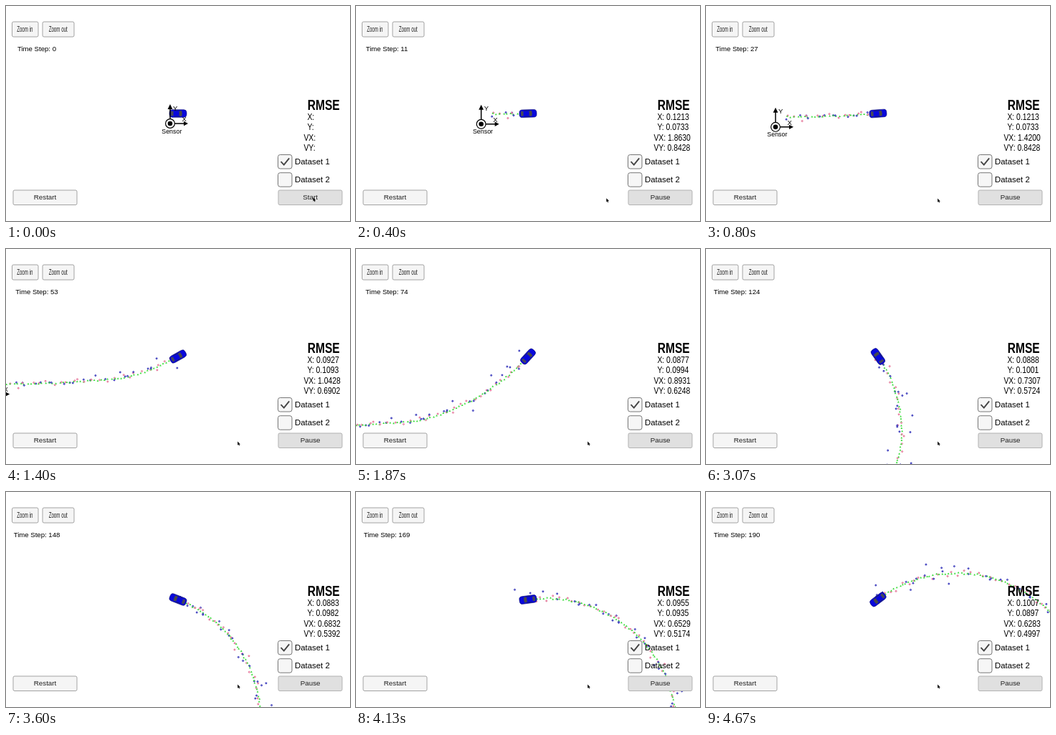
An HTML page that plays this animation: 480 px wide and 300 px high, repeating every 4740 ms.

```html
<!DOCTYPE html>
<html lang="en">
<head>
<meta charset="utf-8">
<title>Tracking simulator</title>
<style>
  html, body { margin: 0; width: 100%; height: 100%; overflow: hidden; background: #fff; }
  svg { display: block; width: 480px; height: 300px; font-family: "Liberation Sans", Arial, sans-serif; fill: #000; }
  .btn rect { fill: #f5f5f5; stroke: #a3a3a3; }
  .btn.on rect { fill: #e0e0e0; stroke: #b2b2b2; }
  .btn text { fill: #222; text-anchor: middle; font-size: 9.8px; }
  .btn .slim { font-size: 10px; }
  .box rect { fill: #f6f6f6; stroke: #777; }
  .box text { font-size: 11.4px; }
  .lidar { fill: #fbe4ec; stroke: #dc4a78; stroke-width: .8; }
  .radar { fill: #a4a4dc; stroke: #1c1cb4; stroke-width: .9; }
  .guess { fill: #34dc34; }
  .axis { fill: none; stroke: #000; stroke-width: 1.5; }
</style>
</head>
<body>
<svg viewBox="0 0 480 300">
  <g id="trail"></g>

  <g id="car">
    <rect x="-12" y="-5.3" width="24" height="10.6" rx="4" fill="#0808dc" stroke="#04046e" stroke-width=".6"/>
    <path d="M-9.6-3.6Q-10.8 0-9.6 3.6L-6.2 2.9Q-6.9 0-6.2-2.9Z" fill="#44485c"/>
    <path d="M1.4-3.1Q2.2 0 1.4 3.1L5 4.2Q6.8 0 5-4.2Z" fill="#46484c"/>
    <path d="M-5.6-4.4L3-4.5L1.2-3.7H-4.6ZM-5.6 4.4L3 4.5L1.2 3.7H-4.6Z" fill="#20245a"/>
  </g>

  <g id="sensor">
    <path class="axis" d="M0 0V-21M0 0H20"/>
    <path d="M0-27L3.4-20H-3.4ZM25 0L19-3.2V3.2Z"/>
    <circle r="6.4" fill="#fff" stroke="#000" stroke-width="1.2"/>
    <circle r="3.3"/>
    <text x="4" y="-18.5" font-size="9.5">Y</text>
    <text x="16.5" y="-3.2" font-size="9.5">X</text>
    <text x="2.3" y="13.6" font-size="8.9" text-anchor="middle">Sensor</text>
  </g>

  <g class="btn">
    <rect x="8.5" y="22" width="36.5" height="21" rx="2"/>
    <text class="slim" transform="translate(26.3 36) scale(.62 1)">Zoom in</text>
  </g>
  <g class="btn">
    <rect x="51" y="22" width="44" height="21" rx="2"/>
    <text class="slim" transform="translate(72.7 36) scale(.62 1)">Zoom out</text>
  </g>
  <g class="btn">
    <rect x="10" y="257" width="89" height="20.5" rx="2"/>
    <text x="54.5" y="270.4">Restart</text>
  </g>
  <g class="btn on">
    <rect x="380" y="257" width="89" height="20.5" rx="2"/>
    <text id="run" x="424.6" y="270.4">Start</text>
  </g>

  <g class="box">
    <rect x="379.5" y="207.5" width="19.5" height="19.5" rx="3"/>
    <path d="M383.6 217.2L387.8 221.6L395.2 212.4" fill="none" stroke="#444" stroke-width="1.9"/>
    <text x="403" y="220.8">Dataset 1</text>
    <rect x="379.5" y="232.7" width="19.5" height="19.5" rx="3"/>
    <text x="403" y="246">Dataset 2</text>
  </g>

  <text id="clock" x="43" y="63.3" font-size="9.6" text-anchor="middle">Time Step: 0</text>
  <text transform="translate(420.8 144.9) scale(.75 1)" font-size="20.7" font-weight="bold">RMSE</text>
  <g id="rmse" font-size="13"></g>
  <path id="cursor" d="M0 0V5.2L1.2 4.2L2 6L2.9 5.6L2.1 3.9H3.7Z"/>
</svg>

<script>
const LOOP = 4740, TICK = 200 / 3, LAST = 70, STEPS = 190;

// [ms, step, then the error of X, Y, VX, VY]
const KEYS = [
  [130, 0, 0, 0, 0, 0],
  [800, 27, .1213, .0733, 1.42, .8428],
  [1400, 53, .0927, .1093, 1.0428, .6902],
  [1870, 74, .0877, .0994, .8931, .6248],
  [2530, 100, .0895, .1029, .7959, .6182],
  [3600, 148, .0883, .0982, .6832, .5392],
  [4670, STEPS, .1007, .0897, .6283, .4997]
];
// squared error sums, which grow steadily with the step
const SUMS = KEYS.map(([, n, ...errors]) => [n, ...errors.map(e => n * e * e)]);
SUMS[0][3] = 27;

// [step, degrees]: the car steers evenly between these
const STEER = [[0, 0], [32, -5], [42, -20], [82, -54], [96, -86], [STEPS, -217]];

const $ = id => document.getElementById(id);
const clamp = (v, lo, hi) => Math.min(hi, Math.max(lo, v));

function make(parent, tag, attrs) {
  const el = document.createElementNS("http://www.w3.org/2000/svg", tag);
  for (const k in attrs) el.setAttribute(k, attrs[k]);
  return parent.appendChild(el);
}

function lerp(table, v, col = 1) {
  let i = 0;
  while (i < table.length - 2 && v >= table[i + 1][0]) i++;
  const a = table[i], b = table[i + 1], u = clamp((v - a[0]) / (b[0] - a[0]), 0, 1);
  return a[col] + (b[col] - a[col]) * u;
}

// drive the car step by step, relative to the sensor
const route = [[11, -14]];
for (let n = 0; n < STEPS; n++) {
  const [x, y] = route[n], speed = Math.max(4.45, 4.97 - .006 * n);
  const a = lerp(STEER, n + .5) * Math.PI / 180;
  route.push([x + speed * Math.cos(a), y + speed * Math.sin(a)]);
}

let seed = 29;
function random() {
  seed = (seed * 16807) % 2147483647;
  return seed / 2147483647;
}
const noise = sd => (random() + random() + random() - 1.5) * 2 * sd;

// lidar and radar take turns; every step leaves an estimate
const marks = route.slice(1).map(([x, y], i) => {
  const g = make($("trail"), "g", { display: "none" });
  if (i % 2) {
    const r = Math.hypot(x, y) + noise(4), a = Math.atan2(y, x) + noise(.026);
    make(g, "circle", { class: "radar", r: 1, cx: r * Math.cos(a), cy: r * Math.sin(a) });
  } else {
    make(g, "circle", { class: "lidar", r: 1, cx: x + noise(2.4), cy: y + noise(2.4) });
  }
  const ex = x + noise(.5), ey = y + noise(.5);
  make(g, "path", { class: "guess", d: `M${ex} ${ey - 1.4}l1.4 2.5h-2.8z` });
  return g;
});

const rows = [["X", 420.4, 158.6], ["Y", 420.4, 173], ["VX", 415.4, 188], ["VY", 415.4, 202]]
  .map(([name, x, y]) => ({
    name, el: make($("rmse"), "text", { transform: `translate(${x} ${y}) scale(.8 1)` })
  }));

function draw(ms) {
  const tick = Math.min(LAST, Math.floor((ms + 3.4) / TICK)), t = Math.round(tick * TICK / 10) * 10;
  const n = Math.round(lerp(KEYS, t));
  const [x, y] = route[n], shift = `translate(${240 - x} ${150 - y})`;

  $("trail").setAttribute("transform", shift);
  $("sensor").setAttribute("transform", shift);
  $("car").setAttribute("transform", `translate(240 150) rotate(${lerp(STEER, n)})`);
  marks.forEach((g, i) => g.setAttribute("display", i < n ? "inline" : "none"));

  $("clock").textContent = `Time Step: ${n}`;
  $("run").textContent = tick ? "Pause" : "Start";
  rows.forEach(({ name, el }, i) => {
    const value = n ? " " + Math.sqrt(lerp(SUMS, n, i + 1) / n).toFixed(4) : "";
    el.textContent = `${name}:${value}`;
  });

  const u = clamp((t - 130) / 400, 0, 1), e = u * u * (3 - 2 * u);
  $("cursor").setAttribute("transform", `translate(${428.6 - 105.4 * e} ${267.3 + 1.2 * e})`);
}

const start = performance.now();
function loop() {
  draw((performance.now() - start) % LOOP);
  requestAnimationFrame(loop);
}
loop();
</script>
</body>
</html>
```
